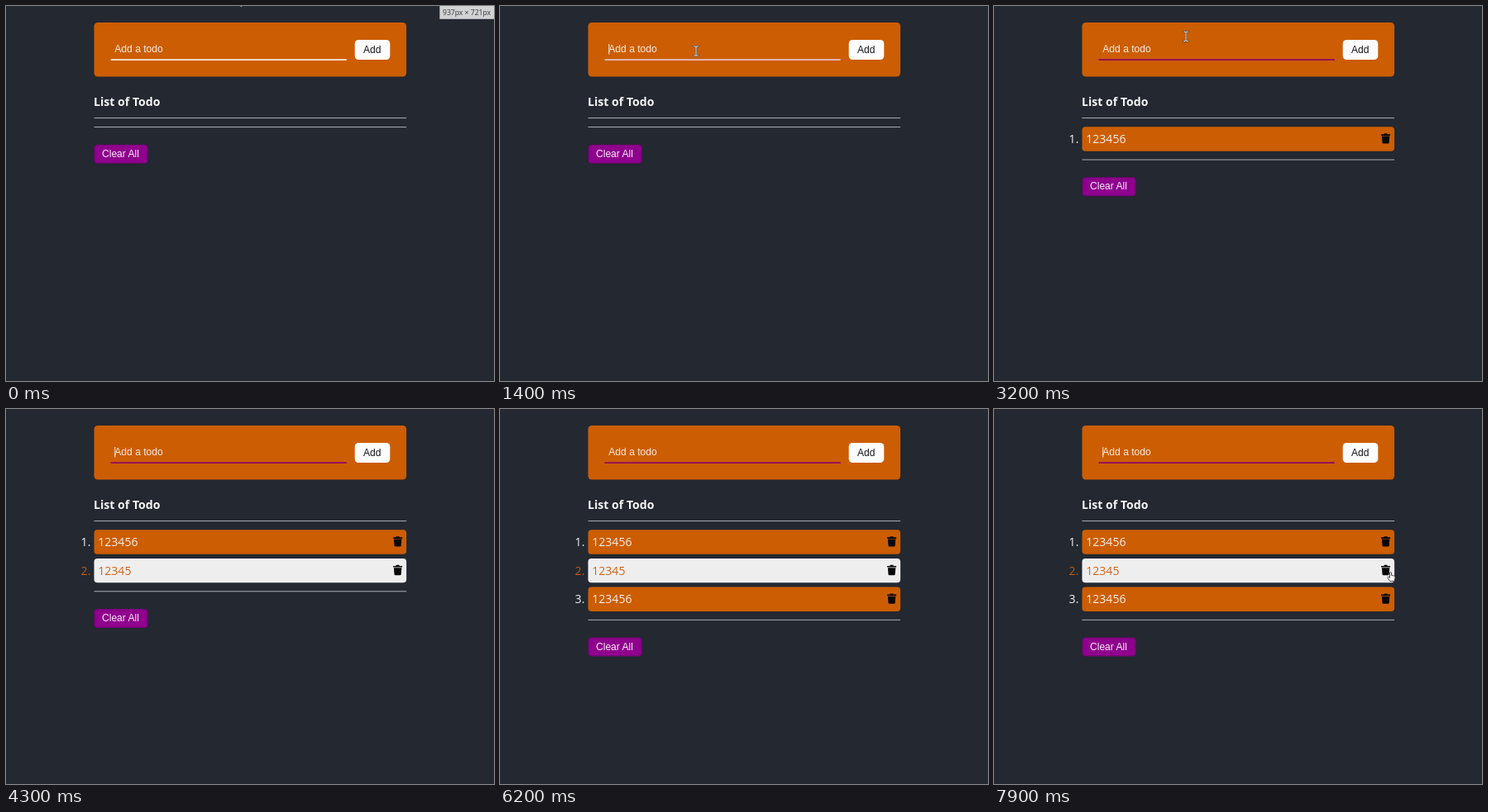
An HTML page for the animation above (8 s loop, 590 by 454 pixels).

```html
<!DOCTYPE html>
<html lang="en">
<head>
<meta charset="utf-8">
<title>Todo list</title>
<style>
  html, body { margin: 0; width: 100%; height: 100%; overflow: hidden; background: #232831; }
  svg { display: block; width: 590px; height: 454px; }
  .ui { font: 12.09px "Liberation Sans", Arial, sans-serif; }
  .body { font: 14.1px "Open Sans", "Noto Sans", sans-serif; }
  .title { font-weight: 700; }
  .tip { font: 8.6px "Open Sans", "Noto Sans", sans-serif; }
</style>
</head>
<body>
<svg viewBox="0 0 590 454" xmlns="http://www.w3.org/2000/svg">
  <defs>
    <g id="trash">
      <path d="M471.3 155.3l.8-1.1h3l.8 1.1h3.2v1.6h-11v-1.6z"/>
      <path d="M468.9 157.6h9.4l-.6 7.7q-.1 1.2-1.3 1.2h-5.6q-1.2 0-1.3-1.2z"/>
    </g>
  </defs>
  <rect width="590" height="454" fill="#232831"/>

  <rect x="106.5" y="20" width="377.6" height="65.5" rx="4.5" fill="#cc5d02"/>
  <text id="field" class="ui" x="131.3" y="56.2" fill="#f6ece2"></text>
  <rect id="caret" y="46" width="1" height="12.6" fill="#f6ece2"/>
  <rect id="underline" x="126.6" y="64.3" width="285.2" height="1.6"/>
  <rect x="421.7" y="41" width="42.6" height="24" rx="4.5" fill="#fcfcfd"/>
  <text class="ui" x="432" y="57" fill="#17171a">Add</text>

  <text class="body title" x="106" y="120.8" fill="#f5f5f5">List of Todo</text>
  <rect x="106.5" y="135" width="377.6" height="1.1" fill="#a0a3a8"/>
  <g id="list"></g>
  <g id="footer">
    <rect x="106.5" y="-.5" width="377.6" height="1.1" fill="#a0a3a8"/>
    <rect x="107.1" y="21.9" width="64" height="21.7" rx="3.6" fill="#8f008d" stroke="#78007a" stroke-width="1.3"/>
    <text class="ui" x="116" y="36.4" fill="#f5f0f5">Clear All</text>
  </g>

  <g id="tip">
    <rect x="524.3" width="65.7" height="15.8" fill="#d0d2d4"/>
    <text class="tip" x="528" y="11.2" fill="#34373b">937px × 721px</text>
  </g>

  <g id="arrow" fill="#111" stroke="#f2f2f2" stroke-width=".8">
    <path d="M0 0V11.3L2.6 9l1.8 4 1.7-.8-1.7-3.9H8z"/>
  </g>
  <g id="beam" fill="none" stroke-linecap="square">
    <path d="M-2.5-5.6H-.7L0-5 .7-5.6H2.5M0-5V5M-2.5 5.6H-.7L0 5 .7 5.6H2.5" stroke="#4a3a2c" stroke-width="2.2"/>
    <path d="M-2.5-5.6H-.7L0-5 .7-5.6H2.5M0-5V5M-2.5 5.6H-.7L0 5 .7 5.6H2.5" stroke="#f3eee8" stroke-width="1"/>
  </g>
  <g id="hand" fill="#fafafa" stroke="#222" stroke-width=".8" stroke-linejoin="round">
    <path d="M-2-5Q-1-6.3 0-5V-1.6L3.3-.9Q4.6-.5 4.5 1L3.8 5.5H-1.6L-4.6 1.4Q-4.6 0-3.4.2L-2 1.4z"/>
  </g>
</svg>
<script>
const LOOP = 8000, STEP = 100, PITCH = 34.65;
const $ = id => document.getElementById(id);

const items = [
  { text: "123456", at: 3000 },
  { text: "12345", at: 4300 },
  { text: "123456", at: 6000 }
];
// Each entry is typed between start and the moment its item is added.
const typing = [
  { start: 2200, rate: 1 },
  { start: 3500, rate: 1 },
  { start: 5100, rate: 1.6 }
];
// Spans when the caret shows in the empty field.
const caretOn = [[1300, 2000], [3000, 3200], [4300, 4500], [6000, 6200], [6600, 7100], [7600, 8000]];
// Pointer path: time, x, y.
const path = [
  [0, 279.5, -12.5], [500, 298, 36], [900, 318, 54], [1300, 237, 54.5], [2200, 237, 54.5],
  [2700, 232, 36.3], [6500, 232, 46], [6800, 190, 150], [7000, 235, 205],
  [7400, 440, 222], [7700, 480.5, 203], [8000, 480.5, 203]
];
const hidden = [[2200, 2700], [3500, 6600]];

const within = (t, spans) => spans.some(([a, b]) => t >= a && t < b);
const ease = p => p * p * (3 - 2 * p);

$("list").innerHTML = items.map((item, i) => {
  const even = i % 2 === 1;
  const ink = even ? "#d0641a" : "#f5efe8";
  return `<g transform="translate(0 ${i * PITCH})">
    <text class="body" x="90.6" y="166.1" fill="${even ? "#c05a12" : "#f2f2f2"}">${i + 1}.</text>
    <rect x="106.5" y="146.3" width="377.6" height="29.4" rx="4" fill="${even ? "#eeeeee" : "#cc5d02"}"/>
    <text class="body" x="111.2" y="166.1" fill="${ink}">${item.text}</text>
    <use href="#trash" fill="#080808"/></g>`;
}).join("");
const rows = [...$("list").children];

function show(el, on) {
  el.setAttribute("visibility", on ? "visible" : "hidden");
}

function typedAt(t) {
  for (let i = 0; i < items.length; i++) {
    const { start, rate } = typing[i];
    if (t >= start && t < items[i].at) {
      return items[i].text.slice(0, 1 + Math.floor((t - start) / STEP * rate));
    }
  }
  return "";
}

function pointerAt(t) {
  const i = path.findIndex(p => p[0] > t);
  const [t0, x0, y0] = path[i - 1], [t1, x1, y1] = path[i];
  const p = ease((t - t0) / (t1 - t0));
  return [x0 + (x1 - x0) * p, y0 + (y1 - y0) * p];
}

function drawPointer(t) {
  const [x, y] = pointerAt(t);
  const inField = x > 127 && x < 412 && y > 33 && y < 66;
  const kind = x > 466 && y > 146 ? "hand" : inField ? "beam" : "arrow";
  for (const id of ["arrow", "beam", "hand"]) {
    show($(id), id === kind && !within(t, hidden));
    $(id).setAttribute("transform", `translate(${x} ${y})`);
  }
}

function underlineColor(t) {
  const p = ease(Math.min(1, Math.max(0, (t - 1250) / 550)));
  const mix = (a, b) => Math.round(a + (b - a) * p);
  return `rgb(${mix(250, 139)},${mix(245, 0)},${mix(240, 110)})`;
}

function draw(time) {
  const t = Math.floor(time % LOOP / STEP) * STEP;
  const typed = typedAt(t);
  $("field").textContent = typed || "Add a todo";
  $("caret").setAttribute("x", 131.3 + typed.length * 12.09 * .556);
  show($("caret"), typed || within(t, caretOn));
  $("underline").setAttribute("fill", underlineColor(t));

  const count = items.filter(item => t >= item.at).length;
  rows.forEach((row, i) => show(row, i < count));
  const y = count ? 151.4 + count * PITCH : 146.5;
  $("footer").setAttribute("transform", `translate(0 ${y})`);

  show($("tip"), t < 1000);
  drawPointer(t);
}

function tick() {
  draw(performance.now());
  requestAnimationFrame(tick);
}
tick();
</script>
</body>
</html>
```
